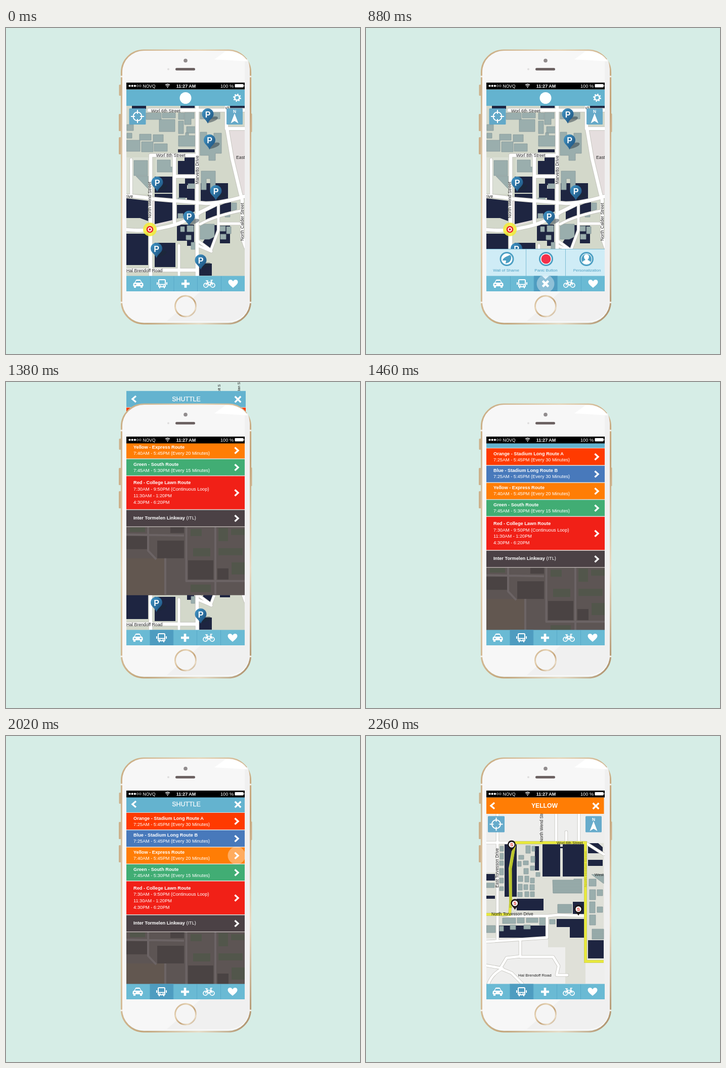
Write an HTML page that moves like this. It is 700 px wide and 645 px high and loops after 2.78 s.

```html
<!DOCTYPE html>
<html lang="en">
<head>
<meta charset="utf-8">
<title>Campus map app</title>
<style>
html, body { margin: 0; width: 100%; height: 100%; overflow: hidden; background: #d6ede6; }
svg { display: block; width: 700px; height: 645px; }
text { font: 9.2px "Liberation Sans", Arial, sans-serif; }
.b { font-weight: bold; }
.mid { text-anchor: middle; }
.label text { font-size: 8.7px; fill: #222; }
.navy { fill: #1e2541; }
.grey { fill: #9aaead; stroke: #87999a; stroke-width: .8; }
.case, .road, .line { fill: none; stroke-linejoin: round; stroke-linecap: round; }
.case { stroke: #c3c2bc; stroke-width: 8.4; }
.road { stroke: #fff; stroke-width: 6.6; }
.thin.case { stroke-width: 6.4; }
.thin.road { stroke-width: 4.8; }
.line { stroke: #fff; stroke-width: 3.4; stroke-linejoin: miter; stroke-linecap: butt; }
</style>
</head>
<body>
<svg viewBox="0 0 700 645">
<defs>
  <clipPath id="screen"><path d="M238 108h234v413h-234z"/></clipPath>
  <linearGradient id="gold" x2="1" y2="1">
    <stop stop-color="#c9ab82"/><stop offset=".3" stop-color="#e6d3b5"/>
    <stop offset=".6" stop-color="#c3a277"/><stop offset=".8" stop-color="#eadcc6"/><stop offset="1" stop-color="#a98a63"/>
  </linearGradient>
  <linearGradient id="blue" x2="1" y2="1"><stop stop-color="#4398c8"/><stop offset="1" stop-color="#184a78"/></linearGradient>
  <pattern id="hatch" width="3" height="3" patternUnits="userSpaceOnUse"><path d="M0 .5h3" stroke="#879a99" stroke-width=".7"/></pattern>
  <g id="pin">
    <path d="M0 17L8 5Q20 2 20 7Q18 13 0 17z" fill="#1b2a35" opacity=".45"/>
    <path d="M0 18C-3 10-11.5 7-11.5-.5A11.5 11.5 0 0 1 11.5-.5C11.5 7 3 10 0 18z" fill="url(#blue)"/>
    <text class="b mid" y="5.5" style="font-size:16px" fill="#fff">P</text>
  </g>
  <g id="stop">
    <path d="M0 13C-2 8-8 5-8-.5A8 8 0 0 1 8-.5C8 5 2 8 0 13z" fill="#1c1516"/>
    <circle r="5.6" fill="#fff"/>
    <text class="b mid" y="3.2" fill="#e02a20">S</text>
  </g>
  <g id="locate">
    <rect width="33" height="32" rx="1.5" fill="#5ba5c8" opacity=".92"/>
    <circle cx="16.5" cy="16" r="8.5" fill="none" stroke="#fff" stroke-width="2"/>
    <path d="M16.5 3v8M16.5 21v8M3.5 16h8M21.5 16h8" stroke="#fff" stroke-width="2"/>
  </g>
  <g id="north">
    <rect width="32" height="32" rx="1.5" fill="#5ba5c8" opacity=".92"/>
    <text class="b mid" x="16" y="9" style="font-size:8.5px" fill="#fff">N</text>
    <path d="M16 10l7.5 19.5l-7.5-4.5l-7.5 4.5z" fill="#fff"/>
  </g>
  <path id="next" class="line" d="M-3.5-6L3 0L-3.5 6"/>
  <path id="back" class="line" d="M4-6L-3 0L4 6"/>
  <path id="close" class="line" d="M-5.8-5.8L5.8 5.8M5.8-5.8L-5.8 5.8"/>
  <path id="streets" d="M283 162.5H472M436 154V199H472M378 154V490M286 252V490M286 252H378M333 254V384M333 293.5H378
    M238 332Q265 333 290 338L395 347Q425 347 472 333M238 399Q278 403 310 395Q350 388 385 364L419 347
    M437 199L447 258L463 325L467 340V414L474 434M238 479H378"/>
  <path id="lanes" d="M247.5 260V332M384 388Q415 371 467 361M420 350V400L405 440L378 420M421 387H467M342 430V490M406 442L378 430"/>
  <path id="avenues" d="M238 211H434L470 234M260 154V402M358 356V399L238 407M238 352H262L284 356H360L380 354L434 356"/>
  <path id="loops" d="M376 154V211M421 154V211M396 190V211M305 403V436L278 439L266 459L238 454M305 437H370L381 455L377 473H398M266 460L288 469L309 490M270 460Q250 470 242 490"/>
</defs>

<g clip-path="url(#screen)">
  <path d="M238 122h234v399h-234z" fill="#d3d8ca"/>
  <path d="M440 202h32v130h-10zM288 340h42v42l-40 12z" fill="#e5dede"/>
  <path d="M238 256h48v72h-48zM296 256h36v36h-36z" fill="#dbe0d5"/>
  <path class="navy" d="M249 154h28v6h-28zM345 154h28v5h-28zM443 154h29v6h-29zM340 240h33v6h-33zM353 254h20v36h-33v-27h13z
    M294 294h35v32h-35zM294 328h35v52l-35 8zM238 337l43 5v40l-16-6h-27zM238 407h43v62h-43zM294 425h41v48h-41zM379 466h28v24h-28z
    M385 307h54v33l-30 5l-24-2zM354 296h19v15h-19zM342 308h16v28h-16zM358 318h15v24h-15zM338 350h35v13l-35 14zM338 389h34v42h-14v-10h-20z"/>
  <path class="navy" d="M395 357l22-5v22l-22 9zM423 351l22-9v25l-22 7zM389 424l22-34h6v10l-12 36zM423 391h20v35h-20z"/>
  <path class="grey" d="M239 191h13v12h-13zM277 168h30v13h-30zM309 168h26v10h-26zM303 181h31v24h-31zM264 210h23v12h-23zM291 211h20v14h-20z
    M238 222h27v22h-27zM268 225h23v20h-23zM293 229h26v15h-26zM239 208h10v10h-10zM341 168h11v13h-11zM353 167h19v12h-6v12h-13z
    M341 184h10v25h-10zM357 195h18v13h-18zM341 213h14v-6h6v6h13v21h-33z"/>
  <path class="grey" d="M253 262h27v30h-27zM299 261h26v14h5v10h-31zM257 293h24v25zM384 166h39v14h-39zM384 206h13v10h14v-8h15v40h-12v14h-13v-10h-17z
    M386 283h28v37h-10v-22h-8v22h-10zM340 336h14v9h-14zM360 308h13v9h-13zM340 367h10v9h-10zM345 393h8v10h-8zM358 391h13v12h-13zM356 410h10v9h-10z
    M384 388h28v25l-10 5h-18zM423 392h11v10h-11zM436 393h9v14h-9zM424 408h11v10h-11zM446 346h10v13l-10 3zM366 424h8v14h-8zM433 366h10v8h-10z"/>
  <use href="#streets" class="case"/><use href="#lanes" class="case thin"/>
  <use href="#streets" class="road"/><use href="#lanes" class="road thin"/>
  <g class="label">
    <text x="287" y="167">Worl 6th Street</text><text x="297" y="255">Worl 8th Street</text>
    <text x="237" y="336">rive</text><text x="455" y="258.5">East</text><text x="238" y="483">Hal Brendoff Road</text>
    <text transform="translate(381 309) rotate(-90)">Marvetto Drive</text>
    <text transform="translate(287 376) rotate(-90)">North Wend Street</text>
    <text transform="translate(469.5 421) rotate(-90)">North Calder Street</text>
    <text transform="translate(440 161) rotate(-90)">S</text>
  </g>
  <use href="#locate" x="243.5" y="159"/><use href="#north" x="436" y="159"/>
  <use href="#pin" x="399" y="171"/><use href="#pin" x="402.5" y="222.5"/><use href="#pin" x="299" y="306"/>
  <use href="#pin" x="415" y="323"/><use href="#pin" x="362" y="373.5"/><use href="#pin" x="297.5" y="437"/><use href="#pin" x="385" y="460"/>
  <circle cx="284.5" cy="398.5" r="13.5" fill="#f2ec35" opacity=".85"/>
  <circle cx="284.5" cy="398.5" r="5.5" fill="#fff" stroke="#e8202a" stroke-width="2.6"/><circle cx="284.5" cy="398.5" r="2.2" fill="#e8202a"/>
  <path d="M238 122h234v32h-234z" fill="#64b3cf"/>
  <circle cx="355" cy="138.5" r="11.5" fill="#fff"/>
  <g fill="none" stroke="#fff" stroke-width="2.6"><circle cx="457" cy="138" r="4.7"/><circle cx="457" cy="138" r="6.6" stroke-dasharray="2.6 2.58"/></g>

  <g id="panel">
    <path d="M238 437h234v54h-234z" fill="#cfecf6"/>
    <path d="M238 437.5h234M316.5 437v54M394.5 437v54" stroke="#7dbdd5"/>
    <g fill="#fff" stroke="#4c9fc3" stroke-width="3"><circle cx="278.5" cy="457" r="12.5"/><circle cx="356" cy="457" r="12.5"/><circle cx="436" cy="457" r="12.5"/></g>
    <path d="M270 460q1-5 8-8l7-3l2 3q1 8-5 12l-6 2l1-6z" fill="#4c9fc3"/>
    <circle cx="356" cy="457" r="9.5" fill="#f5304a"/>
    <circle cx="436" cy="457" r="10" fill="#4c9fc3"/>
    <path d="M428 464q1-4 6-5q-3-3-3-6a5 5.5 0 0 1 10 0q0 3-3 6q5 1 6 5q-8 6-16 0z" fill="#fff"/>
    <g class="mid" fill="#4c9fc3"><text x="277" y="482" style="font-size:8px">Wall of Shame</text><text x="356" y="482" style="font-size:8px">Panic Button</text><text x="437" y="482" style="font-size:8px">Personalization</text></g>
  </g>
</g>

<g id="sheet">
  <g class="label">
    <text transform="translate(424 121) rotate(-90)" style="font-size:7.5px">olt S</text><text transform="translate(463 121) rotate(-90)" style="font-size:7.5px">dan S</text>
  </g>
  <path d="M238 119h236v33h-236z" fill="#64b3cf"/>
  <use href="#back" x="253" y="135"/><use href="#close" x="458.5" y="135.5"/>
  <text class="mid" x="356.5" y="139.2" style="font-size:12.4px" fill="#fff" stroke="#fff" stroke-width=".25">SHUTTLE</text>
  <path d="M238 387h236v136h-236z" fill="#5d5554"/>
  <path d="M238 450h77v73h-77z" fill="#66594f" opacity=".6"/>
  <path d="M299 415h53v35h-53zM325 388h27v12h-27zM360 454h50v38h-50zM238 406h42v26h-42zM418 470h22v22h-22z" fill="#4a4343"/>
  <path d="M245 389h30v9h-30zM365 392h22v14h-22zM370 430h34v16h-34zM420 390h19v26h-19zM445 392h29v12h-29zM420 430h48v14h-48zM446 458h28v24h-28zM365 502h40v15h-40z" fill="#52564b"/>
  <path d="M238 403L352 405M281 388V435L297 452M356.5 388V495M414 388V523M355 495H474M315 450V523" fill="none" stroke="#6c6465" stroke-width="4"/>
  <g id="rows"></g>
</g>

<g clip-path="url(#screen)">
  <g id="route">
    <path d="M238 121h236v370h-236z" fill="#eeeeed"/>
    <path d="M262 212h172v278h-40v-72h-34v-18h-98zM437 212h33v230h-33zM238 270h20v130h-20z" fill="#dfe0d8"/>
    <path class="navy" d="M274 214h24v104h-24zM334 218h8v48h-8zM349 214h35v64h-35zM389 214h43v64h-43zM298 322h53v23h-53zM262 375h95v24h-95z
      M377 362h55v37h-29v-21h-26zM409 328h23v24h-23zM439 212h20l9 8v12h-29zM439 245h29v12h-29zM439 404h31v36h-31zM238 273h17v13h-17zM238 316h17v6h-17zM384 219h6v3h-6z"/>
    <path class="grey" d="M265 218h7v10h-7zM265 232h7v12h-7zM264 247h8v9h-8zM264 262h8v13h-8zM264 281h8v10h-8zM264 298h8v8h-8zM302 236h10v8h-10zM300 248h7v10h-7zM311 247h10v8h-10z
      M316 217h9v15h-9zM328 218h6v10h-6zM326 238h8v12h-8zM312 262h9v11h-9zM325 257h8v9h-8zM336 270h8v8h-8zM301 277h9v11h-9zM314 277h8v12h-8z"/>
    <path class="grey" d="M325 281h8v10h-8zM301 293h8v12h-8zM312 294h8v10h-8zM324 294h9v11h-9zM300 309h9v9h-9zM314 308h8v10h-8zM325 308h8v10h-8zM369 285h42v-2h16v28h-57zM379 333h28v17h-28z
      M442 304h12v20h-12zM457 304h11v12h-11zM442 328h11v22h-11zM457 338h11v11h-11zM442 354h12v20h-12zM447 382h23v20h-23zM441 283h14v14h-14z"/>
    <path class="grey" d="M270 360h26v11h-26zM299 358h14v12h-14zM317 360h23v9h-23zM343 358h12v16h-12zM363 363h11v9h-11zM264 376h8v10h-8zM285 374h11v9h-11zM312 374h13v8h-13zM238 291h16v9h-16zM238 375h18v14h-18zM446 274h24v18z"/>
    <path d="M369 283h58v28h-58zM379 333h28v17h-28zM447 382h23v20h-23z" fill="url(#hatch)"/>
    <use href="#avenues" class="case thin"/><use href="#loops" class="case thin"/>
    <use href="#avenues" class="road thin"/><use href="#loops" class="road thin"/>
    <path d="M238 353H284L286 330L285 262L294 211H434V446H470" fill="none" stroke="#c7c86a" stroke-width="6"/>
    <path d="M238 353H284L286 330L285 262L294 211H434V446H470" fill="none" stroke="#e8e93c" stroke-width="4.4"/>
    <path d="M286 340V262L294 214" fill="none" stroke="#b9c42c" stroke-width="5"/>
    <g class="label">
      <text x="377" y="213.5" style="font-size:7.8px">Worl 6th Street</text><text x="452" y="277" style="font-size:8px">West</text>
      <text x="248" y="355" style="font-size:8.4px">North Torvesson Drive</text><text x="301" y="476" style="font-size:8px">Hal Brendoff Road</text>
      <text transform="translate(350 210) rotate(-90)" style="font-size:8.3px">North Wend Street</text>
      <text transform="translate(262 300) rotate(-90)" style="font-size:8.3px">East Torvesson Drive</text>
      <text transform="translate(437 299) rotate(-90)" style="font-size:8px;fill:#b5b832">North Hobbel Street</text>
    </g>
    <use href="#locate" x="241" y="158.5"/><use href="#north" x="434" y="158.5"/>
    <use href="#stop" x="288" y="215"/><use href="#stop" x="294.5" y="331"/><use href="#stop" x="420" y="342.5"/>
    <path d="M238 121.5h232.5v32.5h-232.5z" fill="#ff7d05"/>
    <use href="#back" x="250" y="138"/><use href="#close" x="454.5" y="138.5"/>
    <text class="b mid" x="353" y="142" style="font-size:12.2px" fill="#fff">YELLOW</text>
  </g>

  <path d="M238 490.5h234v30.5h-234z" fill="#6abad4"/>
  <g id="tabs">
    <path id="cell" d="M285 490.5h47v30.5h-47z" fill="#4e9cc0"/>
    <path d="M285.5 491v30M332 491v30M378.5 491v30M425.5 491v30" stroke="#58a9c8"/>
    <path id="notch" d="M348 490.5h14l-7 6.5z" fill="#cfecf6"/>
    <g transform="translate(261.5 506)">
      <path d="M-10 1q0-3 3-3.5l2-4q.6-1.7 2-1.7h6q1.4 0 2 1.7l2 4q3 .5 3 3.5v4h-1.5v3h-4v-3h-9v3h-4v-3h-1.5z" fill="#fff"/>
      <path d="M-5.5-2.3l1.5-3.4h8l1.5 3.4zM-7.5.5h3.5v2h-3.5zM4 .5h3.5v2h-3.5z" fill="#62b0cf"/>
    </g>
    <g transform="translate(308.5 506)" fill="none" stroke="#fff">
      <rect x="-6.5" y="-8" width="13" height="14" rx="1.5" stroke-width="2"/>
      <path d="M-6.5 1.5h13M-4.5 6v3M4.5 6v3M-9.5-3v5M9.5-3v5" stroke-width="2"/><path d="M-4.5 4h2.5M2 4h2.5" stroke-width="1.5"/>
    </g>
    <path id="plus" d="M-8 0H8M0-8V8" stroke="#fff" stroke-width="4.6"/>
    <g transform="translate(402 506)" fill="none" stroke="#fff" stroke-width="1.7">
      <circle cx="-6.8" cy="3" r="4.2"/><circle cx="6.8" cy="3" r="4.2"/>
      <path d="M-6.8 3L-3.5-3H4.5L0 3.5L-4.5-5.5M-7-6h5M6.8 3L3.5-7H7"/>
    </g>
    <path transform="translate(449 506)" d="M0 8C-3 5-9.5 1-9.5-3.5C-9.5-9-2-9.5 0-4.5C2-9.5 9.5-9 9.5-3.5C9.5 1 3 5 0 8z" fill="#fff"/>
  </g>
  <circle id="tap" r="17.5" fill="#fff" opacity=".36"/>
</g>

<g fill="#cdb18b">
  <rect x="223.5" y="112" width="4" height="22" rx="1.5"/><rect x="223" y="170" width="4.5" height="34" rx="1.5"/>
  <rect x="223" y="216" width="4.5" height="34" rx="1.5"/><rect x="483" y="169" width="3.5" height="37" rx="1.5"/>
</g>
<rect x="228.5" y="44" width="255" height="541" rx="44" fill="none" stroke="url(#gold)" stroke-width="3.2"/>
<path d="M226.5 96h4M482 96h3M226.5 543h4M482 543h3" stroke="#f7f2ea" stroke-width="3"/>
<path d="M273 45H440a42 42 0 0 1 42 42V541a42 42 0 0 1-42 42H273a43 42 0 0 1-43-42V87a43 42 0 0 1 43-42zM238 108V521H472V108z" fill="#f7f7f7" fill-rule="evenodd"/>
<path d="M385 521H472V62H478Q482 72 482 87V541A42 42 0 0 1 440 580H318z" fill="#f0f0f0"/>
<path d="M412 62L434 46Q466 45 478 66z" fill="#fff"/>
<circle cx="355" cy="64.5" r="3.8" fill="#918c8d"/><circle cx="321" cy="81.5" r="2" fill="#dedddd"/>
<rect x="335" y="79" width="39" height="5" rx="2.5" fill="#6d6363"/>
<circle cx="355" cy="550.5" r="20.5" fill="#f5f5f5" stroke="url(#gold)" stroke-width="3"/>

<path d="M238 108h234v13.5h-234z"/>
<g fill="#fff">
  <circle cx="244.5" cy="114.5" r="2.1"/><circle cx="249.7" cy="114.5" r="2.1"/><circle cx="254.9" cy="114.5" r="2.1"/>
  <g fill="none" stroke="#fff" stroke-width=".7"><circle cx="260.1" cy="114.5" r="1.8"/><circle cx="265.3" cy="114.5" r="1.8"/></g>
  <text x="270.5" y="117.5" style="font-size:8.5px">NOVQ</text>
  <path d="M315.2 113q4.3-4 8.6 0M316.9 115q2.6-2.3 5.2 0" fill="none" stroke="#fff" stroke-width="1.3"/><circle cx="319.5" cy="117" r="1.1"/>
  <text class="b mid" x="356" y="117.5" style="font-size:9px">11:27 AM</text>
  <text x="424" y="117.5">100 %</text>
  <rect x="452.5" y="111" width="17" height="6.5" rx="1"/><path d="M470 113h1v2.5h-1z"/>
</g>
</svg>
<script>
const $ = id => document.getElementById(id);

// top, height, colour, first baseline, line gap, title, more lines
const rows = [
  [152, 33, '#ff3a00', 166, 12, 'Orange - Stadium Long Route A', '7:25AM - 5:45PM (Every 30 Minutes)'],
  [186.5, 32.5, '#4879bb', 199, 12, 'Blue - Stadium Long Route B', '7:25AM - 5:45PM (Every 30 Minutes)'],
  [220.5, 32, '#ff7d05', 233, 12, 'Yellow - Express Route', '7:40AM - 5:45PM (Every 20 Minutes)'],
  [254, 32, '#41ad74', 267, 12, 'Green - South Route', '7:45AM - 5:30PM (Every 15 Minutes)'],
  [287.5, 65.5, '#f12017', 303.5, 12.8, 'Red - College Lawn Route', '7:30AM - 9:50PM (Continuous Loop)', '11:30AM - 1:20PM', '4:30PM - 6:20PM'],
  [354.5, 32.5, '#4b4145', 373, 0, 'Inter Tormelen Linkway <tspan font-weight="400">(ITL)</tspan>']
];
$('rows').innerHTML = rows.map(([y, h, fill, base, gap, ...lines]) =>
  `<rect x="238" y="${y - 1}" width="236" height="${h + 2}" fill="#e3dcd8"/>
   <rect x="238" y="${y}" width="236" height="${h}" fill="${fill}"/>
   <use href="#next" x="456" y="${y + h / 2 + .3}"/>` +
  lines.map((s, i) => `<text ${i ? '' : 'class="b"'} x="252" y="${base + i * gap}" fill="#fff">${s}</text>`).join('')
).join('');

const LOOP = 2780, STEP = 20;
const taps = [[240, 355, 506], [880, 355, 506], [1260, 307.5, 506], [2020, 456, 236.5]];
const part = (t, a, b) => t <= a ? 0 : t >= b ? 1 : (t - a) / (b - a);
const rest = (t, a, b) => (1 - part(t, a, b)) ** 2.7;
const move = (id, x, y, turn = 0) => $(id).style.transform = `translate(${x}px, ${y}px) rotate(${turn}deg)`;
const show = (id, on) => $(id).style.visibility = on ? 'visible' : 'hidden';

function draw(t) {
  const open = t < 600 ? part(t, 240, 320) : 1 - part(t, 880, 960);
  const bus = t > 1260;
  show('panel', open > 0);
  move('panel', 0, 54 * (1 - open));
  show('notch', open === 1);
  show('cell', open > 0 || bus);
  move('cell', bus ? 0 : 47, 0);
  move('plus', 355, 506, 45 * open);
  move('tabs', bus ? -1 : 0, 0);

  show('sheet', bus && t < 2260);
  move('sheet', 0, -402 * rest(t, 1260, 1560));
  show('route', t > 2020);
  move('route', 234 * rest(t, 2020, 2260), 0);

  const tap = taps.find(([begin]) => begin === t);
  show('tap', tap);
  if (tap) move('tap', tap[1], tap[2]);
}

const start = performance.now();
function frame() {
  const t = (performance.now() - start) % LOOP;
  draw(Math.floor(t / STEP) * STEP);
  requestAnimationFrame(frame);
}
frame();
</script>
</body>
</html>
```
